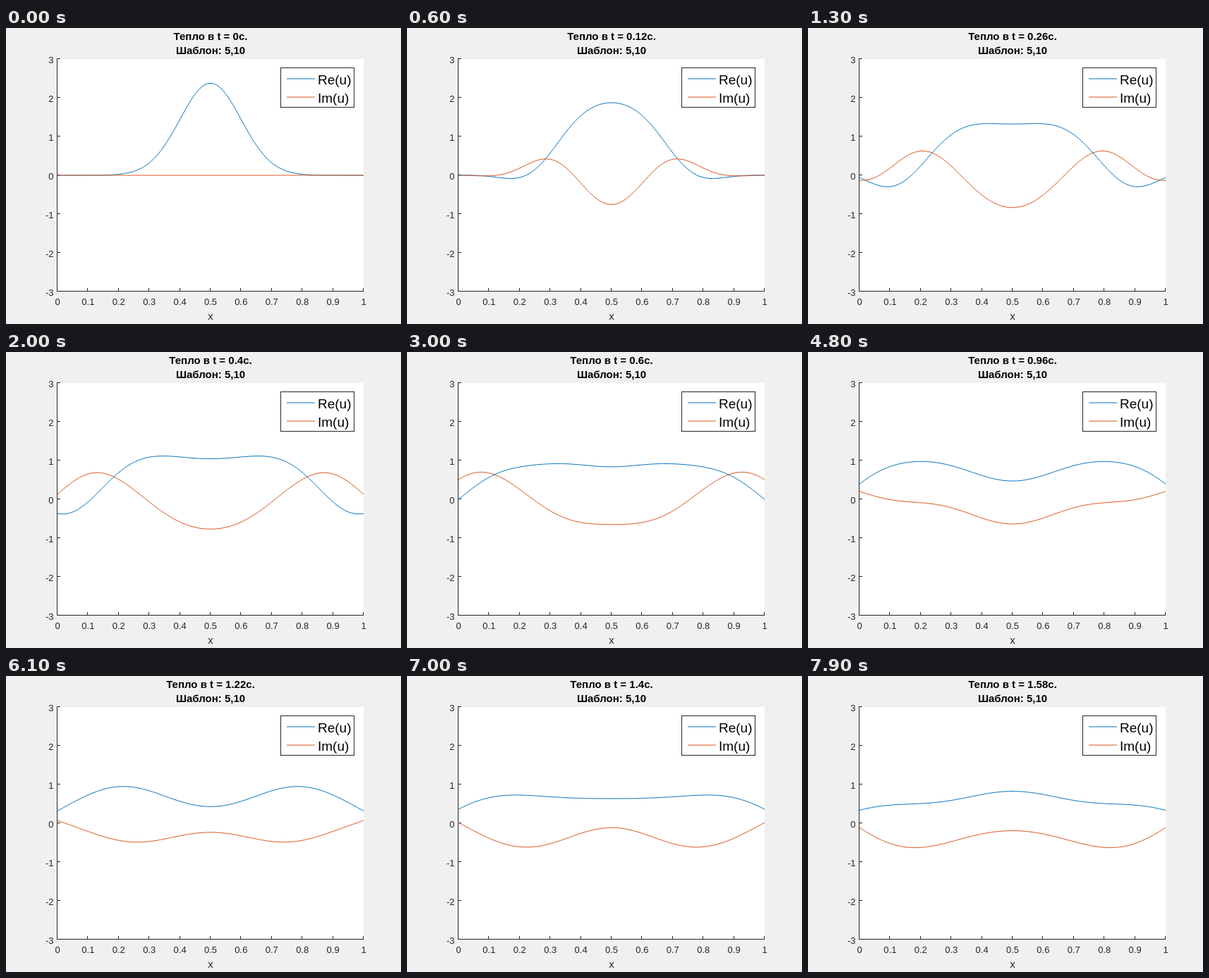
Write an HTML page that moves like this. It is 560 px wide and 420 px high and loops after 8000 ms.

```html
<!DOCTYPE html>
<html lang="ru">
<head>
<meta charset="utf-8">
<title>Re(u), Im(u)</title>
<style>
  html, body { margin: 0; width: 100%; height: 100%; overflow: hidden; background: #f0f0f0; }
  svg { display: block; width: 560px; height: 420px; font-family: "Liberation Sans", Arial, sans-serif; }
  .title { font-weight: bold; font-size: 15px; text-anchor: middle; }
  .tick { font-size: 13px; fill: #262626; text-anchor: middle; }
  .tick.left { text-anchor: end; }
  .label { font-size: 15px; fill: #262626; text-anchor: middle; }
  .key { font-size: 19px; }
  .axis { stroke: #262626; fill: none; }
  .re { stroke: #0072bd; fill: none; }
  .im { stroke: #d95319; fill: none; }
</style>
</head>
<body>
<svg viewBox="0 0 560 420">
  <rect x="73" y="44" width="434" height="330" fill="#fff"/>
  <text class="title" x="290" y="17" id="time"></text>
  <text class="title" x="290" y="37">Шаблон: 5,10</text>
  <g id="ticks"></g>
  <text class="label" x="290" y="414">x</text>
  <path class="re" id="re"/>
  <path class="im" id="im"/>
  <rect class="axis" x="389.5" y="56.5" width="104" height="56" style="fill:#fff"/>
  <path class="re" d="M398 72H438"/>
  <path class="im" d="M398 98H438"/>
  <text class="key" x="442" y="80">Re(u)</text>
  <text class="key" x="442" y="106">Im(u)</text>
</svg>
<script>
const FRAMES = 80, FRAME_MS = 100, FRAME_T = 0.02;
const px = x => 73 + 434 * x;
const py = v => 209 - 55 * v;
const $ = id => document.getElementById(id);

// Axes, with lines snapped to pixel centres
const snap = p => Math.round(p) - 0.5;
let line = 'M72.5 43V373.5H507', labels = '';
for (let i = 0; i <= 10; i++) {
  line += `M${snap(px(i / 10))} 373.5v-4.5`;
  labels += `<text class="tick" x="${px(i / 10)}" y="392.5">${i / 10}</text>`;
}
for (let v = -3; v <= 3; v++) {
  line += `M72.5 ${snap(py(v))}h4.5`;
  labels += `<text class="tick left" x="67.5" y="${py(v) + 5.5}">${v}</text>`;
}
$('ticks').innerHTML = `<path class="axis" d="${line}"/>${labels}`;

// Complex numbers as [re, im]
const add = (a, b) => [a[0] + b[0], a[1] + b[1]];
const sub = (a, b) => [a[0] - b[0], a[1] - b[1]];
const mul = (a, b) => [a[0] * b[0] - a[1] * b[1], a[0] * b[1] + a[1] * b[0]];
const scale = (a, k) => [a[0] * k, a[1] * k];
const inv = a => scale([a[0], -a[1]], 1 / (a[0] * a[0] + a[1] * a[1]));

// u_t = i c u_xx for a spreading Gaussian, Crank-Nicolson on the right half.
// The edge absorbs through a half-derivative in time with a short memory.
const c = 0.04, N = 100, h = 0.5 / N, dt = 0.001, perFrame = Math.round(FRAME_T / dt);
const MEMORY = 32, tail = 1 / Math.sqrt(Math.PI * MEMORY * dt);
const rho = c * dt / (2 * h * h), iRho = [0, rho];
const g = scale([1, -1], 1 / Math.sqrt(2 * c));
const w = Array.from({ length: MEMORY }, (_, j) =>
  2 * (Math.sqrt(j + 1) - Math.sqrt(j)) / Math.sqrt(Math.PI * dt));
const edge = mul([0, 2 * rho * h], g);

const lower = j => [0, j === N ? -2 * rho : -rho];
const upper = j => [0, j === 0 ? -2 * rho : -rho];
const pivot = [], sweep = [];
for (let j = 0; j <= N; j++) {
  let d = [1, 2 * rho];
  if (j === N) d = add(d, scale(edge, w[0]));
  if (j > 0) d = sub(d, mul(lower(j), sweep[j - 1]));
  pivot[j] = inv(d);
  sweep[j] = mul(upper(j), pivot[j]);
}

let u = Array.from({ length: N + 1 }, (_, j) =>
  [Math.pow(0.01 * Math.PI, -0.25) * Math.exp(-50 * (j * h) ** 2), 0]);
let slope = [0, 0];
const past = [u[N]];
const pastAt = back => past[past.length - back] || [0, 0];

function step() {
  let memory = scale(pastAt(1), -w[0]);
  for (let j = 1; j < MEMORY; j++)
    memory = add(memory, scale(sub(pastAt(j), pastAt(j + 1)), w[j]));
  memory = add(memory, scale(pastAt(MEMORY), tail));

  const y = [];
  for (let j = 0; j <= N; j++) {
    const left = u[j ? j - 1 : 1];
    const right = j < N ? u[j + 1] : add(u[N - 1], scale(slope, 2 * h));
    let r = add(mul([1, -2 * rho], u[j]), mul(iRho, add(left, right)));
    if (j === N) r = sub(r, mul(edge, memory));
    if (j > 0) r = sub(r, mul(lower(j), y[j - 1]));
    y[j] = mul(r, pivot[j]);
  }
  for (let j = N - 1; j >= 0; j--) y[j] = sub(y[j], mul(sweep[j], y[j + 1]));
  u = y;
  slope = scale(mul(g, add(scale(u[N], w[0]), memory)), -1);
  past.push(u[N]);
}

function curve(part) {
  let d = '';
  for (let j = -N; j <= N; j++)
    d += (d ? 'L' : 'M') + px(0.5 + j * h).toFixed(2) + ' ' + py(u[Math.abs(j)][part]).toFixed(2);
  return d;
}

const poses = [];
for (let k = 0; k < FRAMES; k++) {
  poses.push({ re: curve(0), im: curve(1), time: `Тепло в t = ${+(k * FRAME_T).toFixed(2)}c.` });
  for (let s = 0; s < perFrame; s++) step();
}

let shown = -1;
function draw() {
  const k = Math.floor(performance.now() / FRAME_MS) % FRAMES;
  if (k !== shown) {
    shown = k;
    $('re').setAttribute('d', poses[k].re);
    $('im').setAttribute('d', poses[k].im);
    $('time').textContent = poses[k].time;
  }
  requestAnimationFrame(draw);
}
draw();
</script>
</body>
</html>
```
